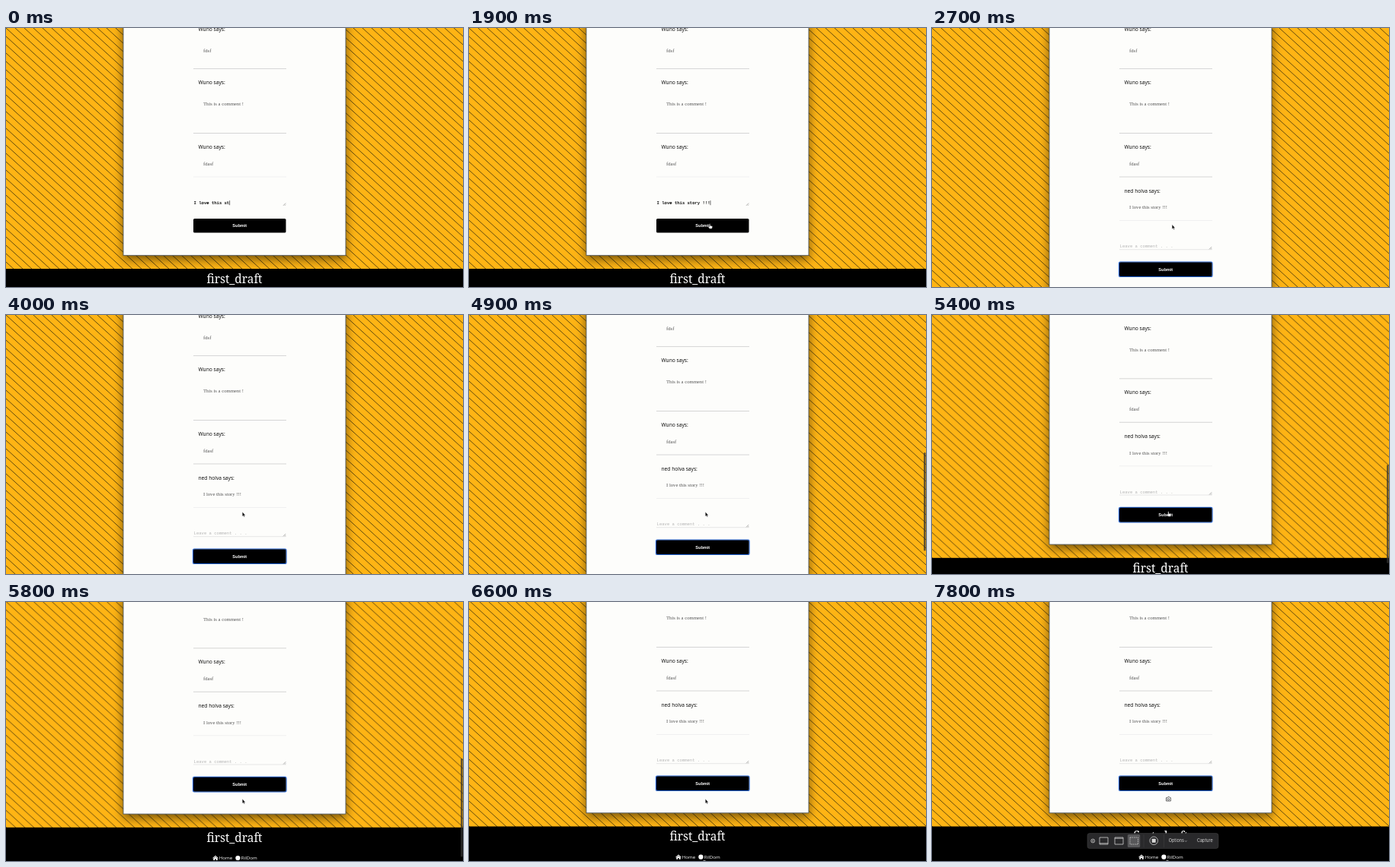
Write an HTML page that moves like this. It is 600x341 px and loops after 7.9 s.

```html
<!DOCTYPE html>
<html lang="en">
<head>
<meta charset="utf-8">
<title>Comment form</title>
<style>
  html, body { margin: 0; width: 100%; height: 100%; overflow: hidden; background: #ffb414; }
  svg { display: block; width: 600px; height: 341px; }
  text { white-space: pre; }
  .who { font: 6.67px "Open Sans", "Noto Sans", sans-serif; fill: #000; }
  .say { font: 6.67px "Liberation Serif", serif; fill: #555; }
  .mono { font: 5.55px "Liberation Mono", monospace; }
  .btn { font: bold 5.55px "Liberation Sans", sans-serif; fill: #fff; text-anchor: middle; }
  .brand { font: 500 15.4px "Noto Serif", serif; fill: #fff; text-anchor: middle; }
  .link { font: 6.15px "Open Sans", sans-serif; fill: #fff; }
  .bar { font: 5.5px Inter, sans-serif; fill: #d8d8d8; }
</style>
</head>
<body>
<svg viewBox="0 0 600 341">
  <defs>
    <pattern id="lines" width="12" height="11" patternUnits="userSpaceOnUse">
      <path d="M-12-11L24 22M-12 0L12 22M0-11L24 11" stroke="#2e2408" stroke-width=".75"/>
    </pattern>
    <filter id="shadow" x="-20%" y="-20%" width="140%" height="140%">
      <feDropShadow dx="0" dy="5" stdDeviation="7" flood-color="#000" flood-opacity=".55"/>
    </filter>
  </defs>

  <g id="page">
    <rect y="-60" width="600" height="600" fill="#ffb414"/>
    <rect y="-60" width="600" height="600" fill="url(#lines)"/>
    <rect id="card" x="154" y="-60" width="292" fill="#fdfdfb" stroke="#3a4450" stroke-width=".8" filter="url(#shadow)"/>
    <g id="comments"></g>

    <g id="tail">
      <path d="M246 196H368" stroke="#eee" stroke-width=".8"/>
      <path id="under" d="M246 234.2H368" stroke="#ddd" stroke-width=".7"/>
      <text id="hint" class="mono" x="246.6" y="231.8" fill="#b5b5b5">Leave a comment . . .</text>
      <text id="typed" class="mono" x="246.6" y="231.8" stroke="#000" stroke-width=".15"></text>
      <path id="caret" d="M0 227.2V233.2" stroke="#000" stroke-width=".6"/>
      <path d="M364 233.8L367.2 230.6M366 233.8L367.2 232.6" stroke="#777" stroke-width=".6"/>
      <rect id="ring" x="245.5" y="250.6" width="122.5" height="19.4" rx="1.6" fill="none" stroke="#1f5fd0" stroke-width="1.2"/>
      <rect x="246" y="251" width="121.5" height="18.6" rx="1.6"/>
      <text class="btn" x="306.7" y="262.3">Submit</text>

      <rect y="317" width="600" height="120"/>
      <text class="brand" x="300" y="335.8">first_draft</text>
      <path d="M271.3 357.3L275 354L278.7 357.3L278.2 358L275 355.2L271.8 358ZM272.3 358L275 355.7L277.7 358V360.3H275.8V358.4H274.2V360.3H272.3Z" fill="#fff"/>
      <text class="link" x="279.7" y="359.5">Home</text>
      <circle cx="304.4" cy="357.2" r="3.1" fill="#fff"/>
      <text class="link" x="308.8" y="359.5">RilDom</text>
      <circle cx="309" cy="363.4" r="1.7" fill="none" stroke="#fff" stroke-width=".6"/>
    </g>
  </g>

  <rect id="thumb" x="597" width="2.6" height="129.5" rx="1.3" fill="#333" fill-opacity=".75"/>

  <g id="tools">
    <rect x="204" y="304.5" width="172" height="20" rx="3" fill="#29292b" stroke="#444" stroke-width=".5"/>
    <rect x="256.8" y="306" width="16.4" height="17" rx="1.5" fill="#58585a"/>
    <g fill="none" stroke="#d0d0d0" stroke-width=".8">
      <circle cx="211.2" cy="314.5" r="2.4"/>
      <path d="M210.2 313.5l2 2m0-2l-2 2"/>
      <path d="M220 310h11v9h-11zM220 317.8h11M240 310h11v9h-11zM240 311.2h11"/>
      <path d="M260 310h10.500v9h-10.500z" stroke-dasharray="1.5 1"/>
      <path d="M278 306v17M304.500 306v17" stroke="#444" stroke-width=".5"/>
      <path d="M332 314.200l1.300 1.300l1.300-1.300" stroke-width=".6"/>
      <circle cx="291.2" cy="314.300" r="5.3"/>
    </g>
    <rect x="288.7" y="311.8" width="5" height="5" rx=".5" fill="#d8d8d8"/>
    <text class="bar" x="310.8" y="316.400">Options</text>
    <text class="bar" x="348" y="316.400">Capture</text>
  </g>

  <g id="arrow"><path d="M0-2.800V3.200L1.300 2L2.300 4L3.200 3.600L2.300 1.700H4Z" fill="#000" stroke="#fff" stroke-width=".4"/></g>
  <g id="hand"><path d="M-1-3q.7-.7 1.200 0V-.8L2.700-.2Q3.300.1 3.100 1L2.400 3.200H-.8L-2.700.5Q-2.500-.4-1.500.3L-1 .7Z" fill="#fff" stroke="#222" stroke-width=".5"/></g>
  <g id="camera" stroke="#444" stroke-width=".8" fill="#fff">
    <path d="M-2.900-1.800H-1.300L-.6-2.900H1.200L1.900-1.800H3V2.500H-2.900Z" stroke-linejoin="round"/>
    <circle cy=".4" r="1.300"/>
  </g>
</svg>
<script>
const $ = id => document.getElementById(id);
const show = (id, on) => $(id).style.display = on ? "" : "none";
const move = (id, x, y) => $(id).setAttribute("transform", `translate(${x} ${y})`);

const LOOP = 7900, STEP = 100, POSTED = 2600, GROWTH = 57.5;
const START = "I love this st", REST = "ory !!!";
const keyTimes = [200, 300, 500, 700, 1000, 1200, 1400];
const scrollKeys = [[4500, 0], [4700, 2], [4900, 12], [5400, 54.7], [5600, 69], [5800, 77.7], [6000, 79]];
const mouseX = [[1700, 325], [1900, 316.500], [2600, 316.500], [3300, 310.800]];
const mouseY = [[1700, 246], [1900, 261], [3300, 262]];

// name, name baseline, text, text baseline, rule below
const comments = [
  ["Wuno", 4, "fdsf", 31.700, 53.600],
  ["Wuno", 74.400, "This is a comment !", 102.300, 138.500],
  ["Wuno", 159.200, "fdasf", 181, 196],
  ["ned holva", 216.800, "I love this story !!!", 238.400, 0]
];
$("comments").innerHTML = comments.map(([who, y, say, sayY, rule], i) => `
  <g id="c${i}"><text class="who" x="252.500" y="${y}">${who} says:</text>
  <text class="say" x="259" y="${sayY}">${say}</text>
  ${rule ? `<path id="rule${i}" d="M246 ${rule}H368" stroke="#ccc" stroke-width=".8"/>` : ""}</g>`).join("");

function at(keys, t) {
  if (t <= keys[0][0]) return keys[0][1];
  for (let i = 1; i < keys.length; i++) {
    const [t0, a] = keys[i - 1], [t1, b] = keys[i];
    if (t <= t1) return a + (b - a) * (t - t0) / (t1 - t0);
  }
  return keys[keys.length - 1][1];
}

function draw(t) {
  const posted = t >= POSTED, grow = posted ? GROWTH : 0;
  const scroll = at(scrollKeys, t);
  move("page", 0, -scroll);
  move("tail", 0, grow);
  $("card").setAttribute("height", 359.300 + grow);
  show("c3", posted);
  show("rule2", posted);

  const text = START + REST.slice(0, keyTimes.filter(k => k <= t).length);
  $("typed").textContent = posted ? "" : text;
  move("caret", 247 + text.length * 3.330, 0);
  show("caret", t < 2100);
  for (const id of ["hint", "under"]) show(id, posted);
  show("ring", t >= 2100);

  $("thumb").setAttribute("y", 176.400 + scroll * .38);
  $("thumb").style.opacity = t < 4600 ? 0 : Math.max(0, Math.min(1, (6600 - t) / 300));

  const tools = t >= 7400;
  show("tools", tools);
  const x = at(mouseX, t), y = at(mouseY, t);
  const top = 251 + grow - scroll;
  const over = y > top && y < top + 18.600;
  show("arrow", t >= 1700 && !over && !tools);
  show("hand", t >= 1700 && over && !tools);
  show("camera", tools);
  move("arrow", x - .5, y);
  move("hand", x, y);
  move("camera", 310.400, 259.500);
}

function tick() {
  const t = performance.now() % LOOP;
  draw(Math.floor(t / STEP) * STEP);
  requestAnimationFrame(tick);
}
tick();
</script>
</body>
</html>
```
